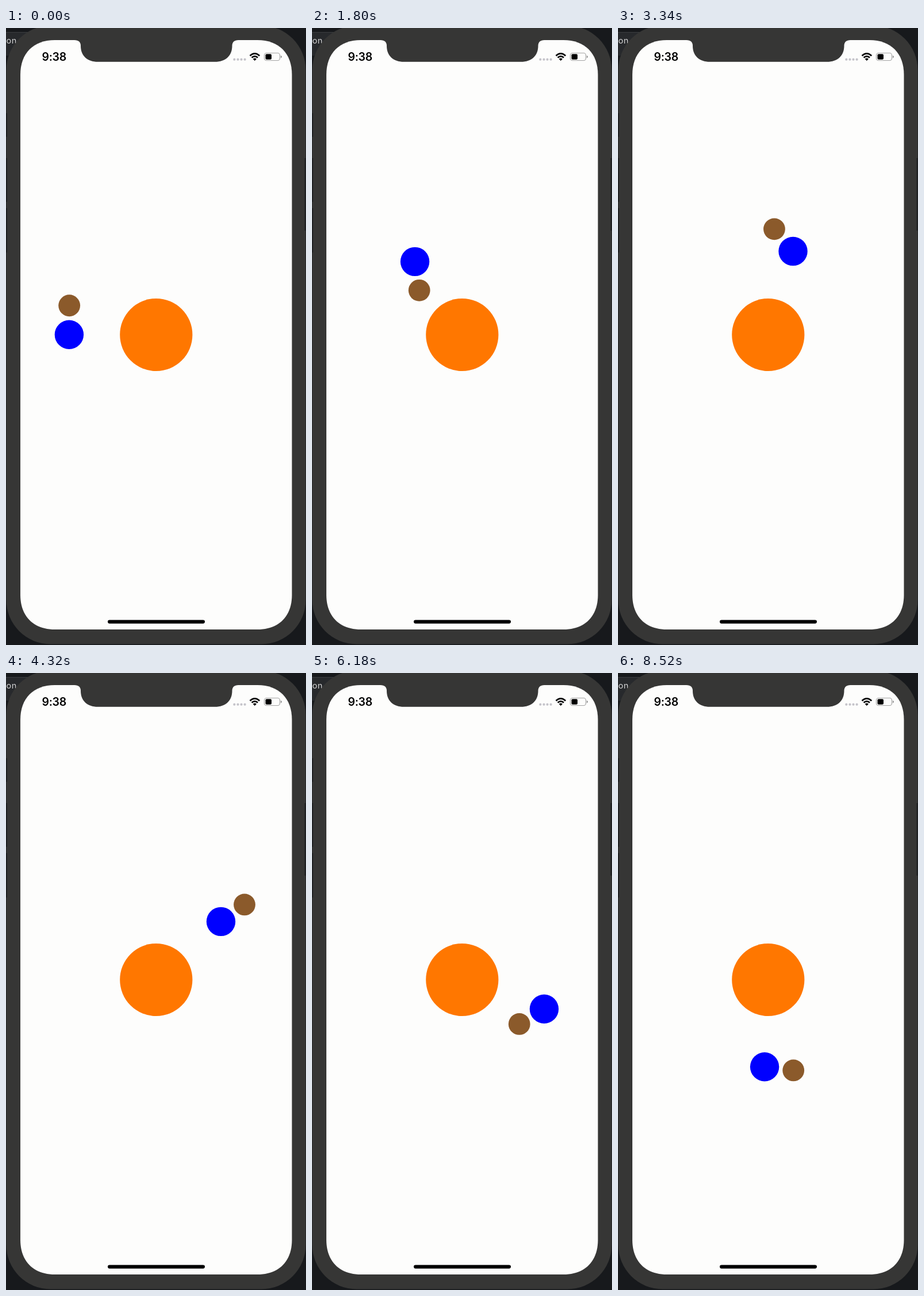
An HTML page for the animation above (8.62 s loop, 522x1072 px).

```html
<!DOCTYPE html>
<html lang="en">
<head>
<meta charset="utf-8">
<title>Orbits</title>
<style>
  html, body { margin: 0; width: 100%; height: 100%; overflow: hidden; background: #17191c; }
  svg { display: block; width: 522px; height: 1072px; }
  text { font-family: Inter, "Liberation Sans", sans-serif; }
</style>
</head>
<body>
<svg viewBox="0 0 522 1072">
  <!-- desktop behind the phone -->
  <rect width="522" height="1072" fill="#17191c"/>
  <rect y="8" width="60" height="40" fill="#27292c"/>
  <rect y="7" width="60" height="1" fill="#3c3e40"/>
  <text x="0.5" y="27" font-size="14.5" letter-spacing="0.5" fill="#d4d4d4">on</text>

  <!-- phone body and side buttons -->
  <rect x="0.5" y="-4" width="521" height="1074.5" rx="77" fill="#363635"/>
  <g fill="#1f2123">
    <rect y="148" width="2" height="41"/>
    <rect y="226" width="2" height="76"/>
    <rect y="313" width="2" height="77"/>
    <rect x="519.5" y="226" width="2.5" height="126"/>
  </g>

  <!-- screen and notch -->
  <path fill="#fdfdfc" d="M85 21H437.500C474.700 21 497.500 43.800 497.500 81V985C497.500 1022.200 474.700 1045 437.500 1045H85C47.800 1045 25 1022.200 25 985V81C25 43.800 47.800 21 85 21Z"/>
  <path fill="#363635" d="M119 20.500V21Q130 21 130 31C130 48 141 58.800 160 58.800H363.500C382.500 58.800 393.500 48 393.500 31Q393.500 21 404.500 21V20.500Z"/>

  <!-- status bar -->
  <text x="62.500" y="57" font-size="19.500" font-weight="600" letter-spacing="-0.3">9:38</text>
  <g fill="#c5c4ca">
    <circle cx="397.300" cy="54.700" r="2.100"/>
    <circle cx="403.500" cy="54.700" r="2.100"/>
    <circle cx="409.500" cy="54.700" r="2.100"/>
    <circle cx="415.600" cy="54.700" r="2.100"/>
  </g>
  <g fill="none" stroke="#000" stroke-width="2.700">
    <path d="M424.500 48.200Q432.800 40.400 441.200 48.200"/>
    <path d="M427.600 51.500Q432.800 46.700 438 51.500"/>
  </g>
  <path d="M429.700 53.700Q432.800 51.200 435.900 53.700L432.800 57Z"/>
  <rect x="449.500" y="43.500" width="27" height="13" rx="3.800" fill="none" stroke="#a3a3a3" stroke-width="1.200"/>
  <rect x="451.500" y="45.300" width="10.500" height="9.400" rx="2"/>
  <path d="M478 47.700Q480 48.500 480 50T478 52.300Z" fill="#8c8c8c"/>

  <rect x="177" y="1028.500" width="169" height="6.200" rx="3.100"/>

  <!-- sun, planet, moon -->
  <circle cx="261.300" cy="533" r="63.100" fill="#ff7700"/>
  <circle id="planet" r="25.200" fill="#0000ff"/>
  <circle id="moon" r="18.900" fill="#8b5a2b"/>
</svg>
<script>
  const LOOP = 8620;
  const planet = document.getElementById('planet');
  const moon = document.getElementById('moon');

  // Steps come in groups of three, held for 100, 20 and 20 ms.
  function stepAt(t) {
    if (t < 20) return 0;
    if (t >= 8520) return 181.5;
    const u = t - 20, rest = u % 140;
    return 1 + 3 * Math.floor(u / 140) + (rest < 100 ? 0 : rest < 120 ? 1 : 2);
  }

  function orbit(center, radius, degrees) {
    const a = degrees * Math.PI / 180;
    return { x: center.x + radius * Math.cos(a), y: center.y + radius * Math.sin(a) };
  }

  function place(el, p) {
    el.setAttribute('cx', p.x.toFixed(2));
    el.setAttribute('cy', p.y.toFixed(2));
  }

  const start = performance.now();

  function draw() {
    const n = stepAt((performance.now() - start) % LOOP);
    const p = orbit({ x: 261.3, y: 533 }, 151.4, 180.1 + 1.5 * n);
    place(planet, p);
    place(moon, orbit(p, 50.5, -89.7 + 4.5 * n));
    requestAnimationFrame(draw);
  }
  draw();
</script>
</body>
</html>
```
